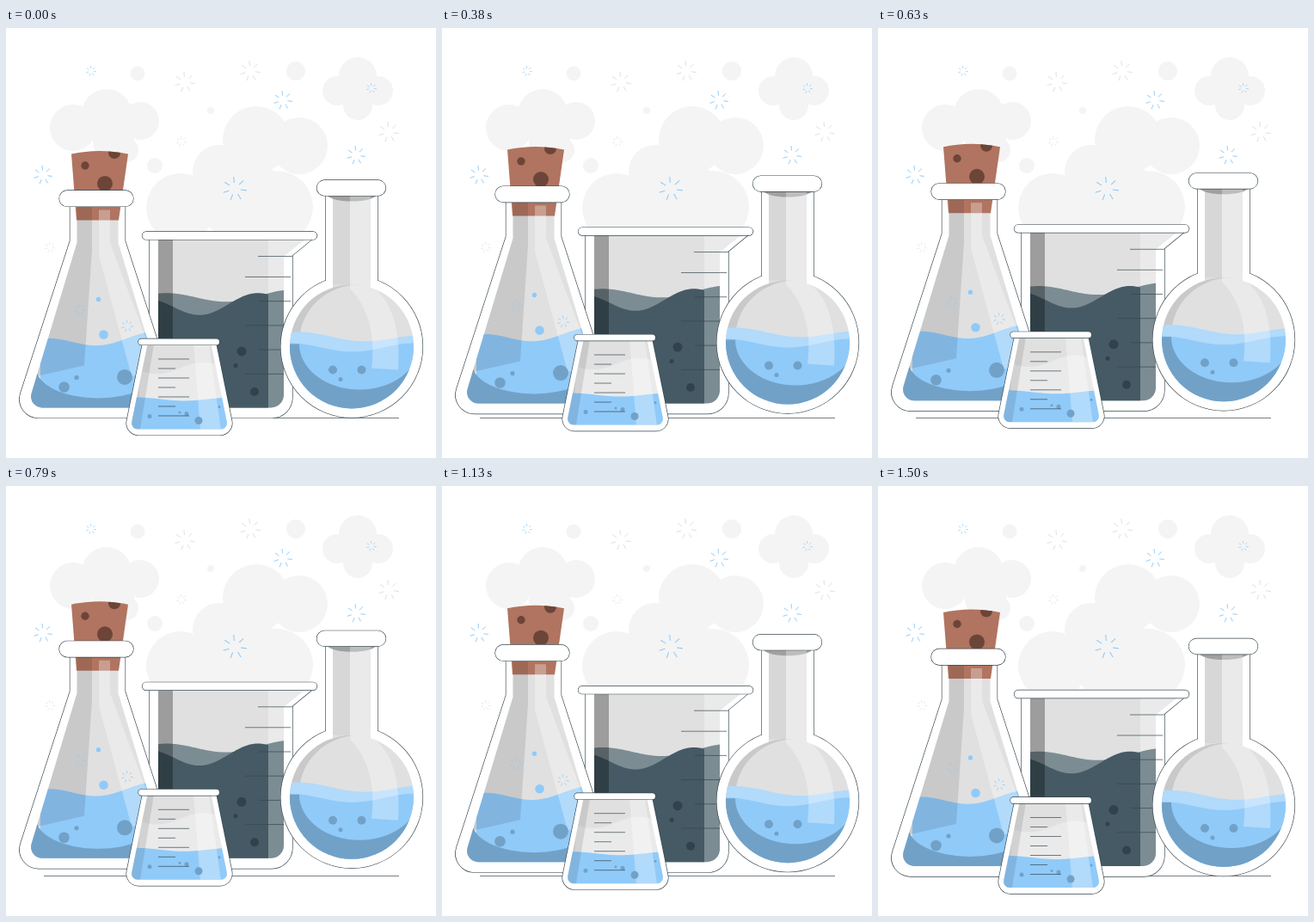
An HTML page with a canvas for the animation above (1540 ms loop, 500 px wide and 500 px high).

```html
<!DOCTYPE html>
<html lang="en">
<head>
<meta charset="utf-8">
<title>Laboratory glassware</title>
<style>
  html, body { margin: 0; width: 100%; height: 100%; overflow: hidden; background: #fff; }
  canvas { display: block; width: 100vw; height: 100vh; }
</style>
</head>
<body>
<canvas id="stage"></canvas>
<script>
  const SIZE = 500, TURN = 2 * Math.PI;
  const PERIOD = 1540, LIFT = 10, LEAD = 40;
  const WHITE = "#fff", CLOUD = "#f4f4f4", GLASS = "#e0e0e0", LINE = "#37474f";
  const BLUE = "#90caf9", PALE = "#b1dafb", NAVY = "#72a1c7";
  const SLATE = "#455a64", MIST = "#7c8c93", INK = "#32424a";
  const SHADE = "rgba(0,0,0,.1)", DEEP = "rgba(0,0,0,.3)", LIGHT = "rgba(255,255,255,.3)";

  const canvas = document.getElementById("stage");
  const ctx = canvas.getContext("2d");

  function fill(color, ...paths) {
    ctx.fillStyle = color;
    paths.forEach(path => ctx.fill(path));
  }

  // Strokes first, then fills, so overlapping paths merge into one silhouette.
  function outline(...paths) {
    ctx.strokeStyle = LINE;
    ctx.lineWidth = 1.3;
    paths.forEach(path => ctx.stroke(path));
    fill(WHITE, ...paths);
  }

  function inside(path, paint) {
    ctx.save();
    ctx.clip(path);
    paint();
    ctx.restore();
  }

  const shape = d => new Path2D(d);

  function disc(x, y, r) {
    const path = new Path2D();
    path.arc(x, y, r, 0, TURN);
    return path;
  }

  const discs = (color, ...list) => fill(color, ...list.map(item => disc(...item)));

  // Symmetric vessel from its right-hand corners: [half width, y, corner radius].
  function vessel(cx, ...corners) {
    const path = new Path2D();
    path.moveTo(cx, corners[0][1]);
    const right = corners.map(([half, y, r = 0]) => [cx + half, y, r]);
    const left = corners.map(([half, y, r = 0]) => [cx - half, y, r]).reverse();
    const around = [...right, ...left];
    around.forEach(([x, y, r], i) => {
      const [nextX, nextY] = around[i + 1] || [cx, corners[0][1]];
      if (r) path.arcTo(x, y, nextX, nextY, r);
      else path.lineTo(x, y);
    });
    path.closePath();
    return path;
  }

  function lip(cx, y, half, height) {
    const path = new Path2D();
    path.roundRect(cx - half, y, 2 * half, height, height / 2);
    outline(path);
  }

  // Liquid with one sine wave as its surface.
  function liquid(color, x0, x1, y, amp, phase, rise = 0) {
    const path = new Path2D();
    for (let x = x0; x <= x1; x++) {
      const u = (x - x0) / (x1 - x0);
      path.lineTo(x, y - rise * u + amp * Math.sin(TURN * (u - phase)));
    }
    path.lineTo(x1, SIZE);
    path.lineTo(x0, SIZE);
    fill(color, path);
  }

  // Everything outside an ellipse, above or below its centre line.
  function rim(color, cx, cy, rx, ry, below) {
    const path = new Path2D(), edge = below ? SIZE : 0;
    path.ellipse(cx, cy, rx, ry, 0, 0, Math.PI, !below);
    path.lineTo(0, cy);
    path.lineTo(0, edge);
    path.lineTo(SIZE, edge);
    path.lineTo(SIZE, cy);
    fill(color, path);
  }

  function line(x0, x1, y) {
    ctx.strokeStyle = LINE;
    ctx.lineWidth = .7;
    ctx.beginPath();
    ctx.moveTo(x0, y);
    ctx.lineTo(x1, y);
    ctx.stroke();
  }

  function sparks(color, r, ...centers) {
    ctx.strokeStyle = color;
    ctx.lineWidth = .4 + r * .05;
    for (const [x, y] of centers) {
      ctx.beginPath();
      for (let i = 0; i < 7; i++) {
        const a = i / 7 * TURN - 1.66, c = Math.cos(a) * r, s = Math.sin(a) * r;
        ctx.moveTo(x + c / 2, y + s / 2);
        ctx.lineTo(x + c, y + s);
      }
      ctx.stroke();
    }
  }

  function sky() {
    discs(CLOUD, [153, 53, 8.5], [337, 50, 11], [238, 96, 4], [173, 160, 9]);
    discs(CLOUD, [78, 116, 27], [117, 100, 29], [156, 108, 22], [125, 132, 24], [140, 142, 14]);
    for (let i = 0; i < 4; i++) {
      const a = i * TURN / 4;
      discs(CLOUD, [409 + 24 * Math.cos(a), 73 + 17 * Math.sin(a), i === 3 ? 22 : 17]);
    }
    inside(shape("M0 0H500V236H0Z"), () => {
      discs(CLOUD, [203, 209, 40], [248, 167, 31], [291, 130, 39], [341, 137, 33], [315, 208, 42], [270, 195, 50]);
    });
    sparks(BLUE, 11, [322, 84], [407, 148], [43, 171]);
    sparks(BLUE, 14, [266, 187]);
    sparks(GLASS, 12, [208, 63], [284, 50], [445, 121]);
    sparks(BLUE, 6, [99, 50], [425, 70]);
    sparks(GLASS, 6, [204, 132], [51, 255]);
    line(44, 457, 453.5);
  }

  function bigBeaker() {
    const cx = 250, inner = vessel(cx, [73, 246], [73, 442, 15]);
    outline(vessel(cx, [83, 242], [83, 454, 24]), shape("M330 242H361L333 265H330Z"));
    fill(GLASS, inner, shape("M323 246H348L323 266Z"));
    fill(LIGHT, shape("M305 246H348L323 266V320H305Z"));
    inside(inner, () => {
      liquid(MIST, 177, 324, 315, 6, .3, 4);
      liquid(SLATE, 177, 305, 326, 11, .14, 7);
      fill(DEEP, shape("M177 246H194V442H177Z"));
      discs(INK, [274, 376.5, 5.5], [267, 393, 2.5], [289, 423.5, 5]);
    });
    line(293, 333, 266);
    for (let i = 0; i < 5; i++) line(i % 2 ? 294 : 278, i < 2 ? 331 : 323, 290 + 28.2 * i);
    lip(260, 237.5, 101.5, 9);
  }

  function bulbFlask() {
    const cx = 402, cy = 371, bulb = disc(cx, cy, 72), neck = vessel(cx, [22, 194], [22, 306]);
    outline(vessel(cx, [30, 190], [30, 300]), disc(cx, cy, 82.5));
    fill(GLASS, neck, bulb);
    fill("rgba(0,0,0,.04)", shape("M380 195H400V299H380Z"));
    fill("#a0a0a0", shape("M373 195H431Q424 202 402 202T373 195Z"));
    inside(bulb, () => {
      rim(SHADE, 411, 366, 70, 67, false);
      liquid(PALE, 330, 475, 358, 4.5, .33, -4);
      liquid(BLUE, 330, 475, 372, 5, .25);
      rim(NAVY, 411, 368, 70, 53, true);
      discs(NAVY, [380, 398, 5], [413.5, 398, 5], [389, 409, 2.5]);
    });
    fill(LIGHT, shape("M400 195H424V300C449 317 459 350 456 398L425 396C430 360 422 325 400 304Z"));
    lip(401.5, 177.5, 40, 18);
  }

  function coneFlask() {
    const cx = 106.5, inner = vessel(cx, [24, 200], [24, 250], [82, 442, 13]);
    const cork = shape("M76 147Q108 140 142 147L131 224H82Z");
    outline(vessel(cx, [32, 200], [32, 248], [99, 454, 22]));
    fill(GLASS, inner);
    fill("#b07460", cork);
    inside(cork, () => discs("#6c4538", [92, 160.5, 4.7], [115, 181.5, 9], [126, 145.5, 7]));
    inside(inner, () => {
      liquid(BLUE, 40, 165, 368, 6, .3, 8);
      rim(NAVY, 107, 396, 72, 35, true);
      fill(SHADE, shape("M82 208H100V258L91 393L20 409Z"));
      fill(LIGHT, shape("M108 212H121V250L164 365L170 405H146L108 265Z"));
      discs(BLUE, [113.5, 357, 5.3], [107.5, 316, 2.7]);
      discs(NAVY, [67.5, 418, 6.3], [82, 407, 2.6], [138, 406.5, 9]);
    });
    sparks(BLUE, 7, [86, 328], [141, 347]);
    lip(105, 189.5, 43, 18.5);
  }

  function smallBeaker() {
    const cx = 201.5, inner = vessel(cx, [37, 368], [57, 467, 7]);
    outline(vessel(cx, [42.5, 366], [64.5, 474, 14]));
    fill(GLASS, inner);
    inside(inner, () => {
      liquid(LIGHT, 155, 250, 399, 5, 0, 6);
      liquid(BLUE, 145, 258, 432, 2, .3);
      fill(SHADE, shape("M164 368H172L156 467H140Z"));
      fill(LIGHT, shape("M218 368H236L250 468H226Z"));
      discs(NAVY, [167, 452, 2.5], [202, 447.5, 1.5], [210, 449, 2.5], [224, 457, 4.5], [248, 441, 1.5]);
    });
    for (let i = 0; i < 7; i++) line(177, i % 2 ? 197 : 213, 385.5 + 11 * i);
    lip(201, 362, 47, 7);
  }

  // The glassware floats up and down at a constant speed.
  function draw(now) {
    const scale = window.devicePixelRatio || 1;
    canvas.width = innerWidth * scale;
    canvas.height = innerHeight * scale;
    ctx.scale(canvas.width / SIZE, canvas.height / SIZE);
    sky();
    const phase = (now + LEAD) % PERIOD / PERIOD;
    ctx.translate(0, -LIFT * (1 - Math.abs(1 - 2 * phase)));
    [bigBeaker, bulbFlask, coneFlask, smallBeaker].forEach(paint => paint());
  }

  const start = performance.now();
  function loop() {
    draw(performance.now() - start);
    requestAnimationFrame(loop);
  }
  loop();
</script>
</body>
</html>
```
